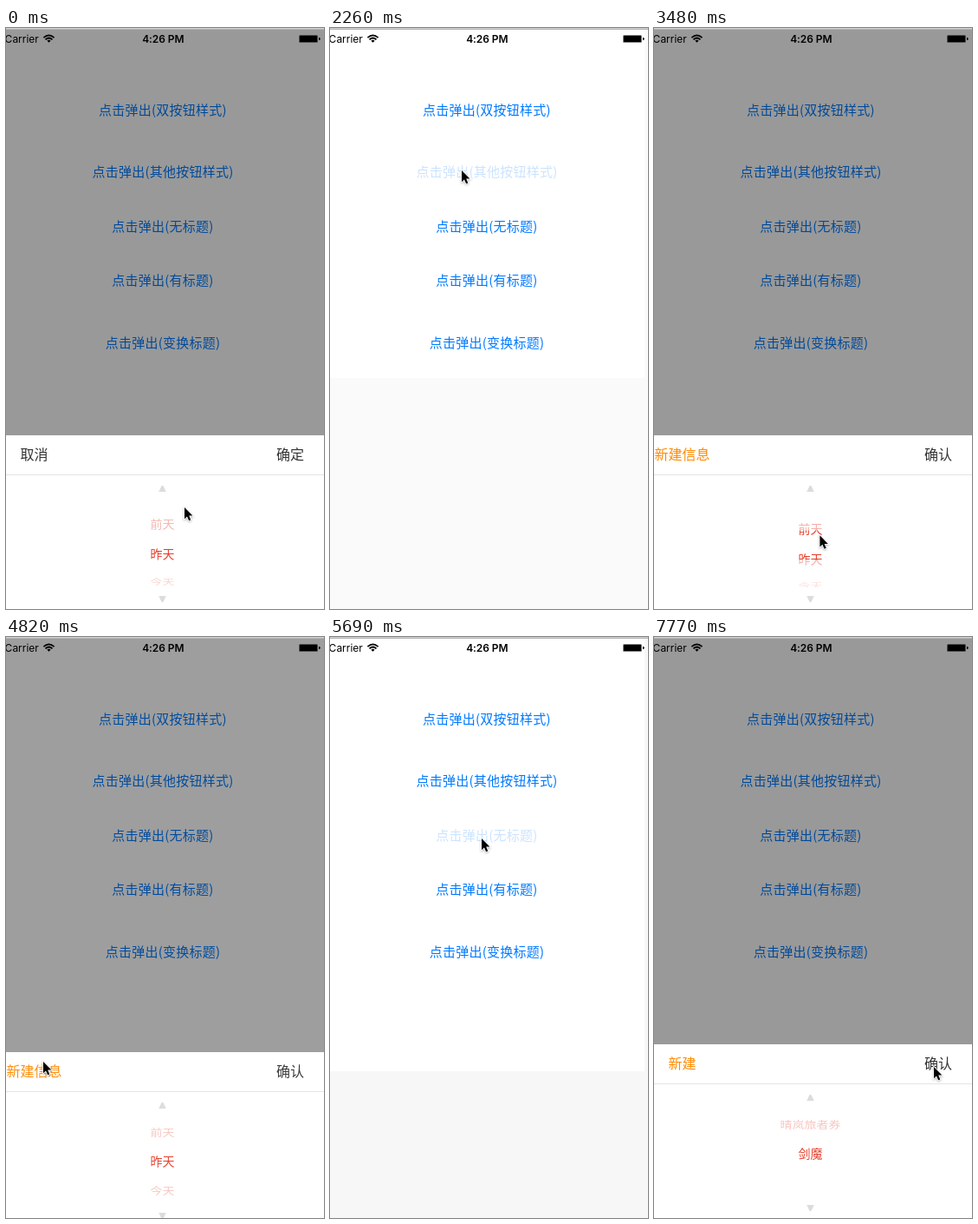
Write an HTML page that moves like this. It is 367 px wide and 669 px high and loops after 8000 ms.

```html
<!DOCTYPE html>
<html lang="zh-CN">
<head>
<meta charset="utf-8">
<style>
  html, body { margin: 0; width: 100%; height: 100%; overflow: hidden; background: #fff; }
  svg { display: block; width: 100%; height: 100%; }
  text { font-family: "Noto Sans CJK SC", "Noto Sans CJK", sans-serif; text-anchor: middle; }
  .status text { font: 400 12px Inter, sans-serif; text-anchor: start; }
  .status .clock { font-weight: 600; text-anchor: middle; letter-spacing: -.08px; }
  #links { font-size: 15px; letter-spacing: .25px; fill: #007aff; }
  .bar { font-size: 16px; fill: #333; }
  .wheel { font-size: 14px; fill: #e63c28; }
  #pointer { filter: drop-shadow(0 1px 1px rgba(0, 0, 0, .3)); }
</style>
</head>
<body>
<svg viewBox="0 0 367 669">
  <defs>
    <clipPath id="band"><rect y="109.5" width="367" height="34"/></clipPath>
    <clipPath id="beyond">
      <rect y="78" width="367" height="31.5"/>
      <rect y="143.5" width="367" height="31.5"/>
    </clipPath>
  </defs>

  <rect width="367" height="669" fill="#fff"/>
  <g id="residue">
    <rect id="haze" y="2" width="367" height="667"/>
    <rect id="cleared" y="2" width="363" fill="#fff"/>
  </g>

  <g class="status">
    <text x="-1.4" y="17">Carrier</text>
    <g fill="none" stroke="#000" stroke-width="1.7">
      <path d="M43.4 11.2Q49.5 5.6 55.6 11.2M45.5 13.3Q49.5 9.7 53.5 13.3"/>
      <path d="M49.5 16.8L47.4 14.7Q49.5 13 51.6 14.7Z" fill="#000" stroke="none"/>
    </g>
    <text class="clock" x="181.3" y="17">4:26 PM</text>
    <rect x="338" y="8" width="22" height="9" rx="1.5" fill-opacity=".5"/>
    <rect x="339" y="9" width="20" height="7" rx=".5"/>
    <path d="M361 10.8Q362.8 11.2 362.8 12.5T361 14.2Z"/>
  </g>

  <g id="links"></g>

  <g id="modal">
    <rect width="367" height="669" fill="#000" fill-opacity=".4"/>
    <g id="sheet">
      <rect width="367" height="201" fill="#fff"/>
      <rect y="45" width="367" height="1" fill="#e4e4e4"/>
      <g class="bar">
        <text id="left" x="32.5" y="28.3"></text>
        <text id="right" x="328" y="28.3"></text>
      </g>
      <path d="M176.3 65h8.4l-3-6.4q-1.2-1.6-2.4 0zM176.3 185h8.4l-3 6.4q-1.2 1.6-2.4 0z" fill="#dcdcdc"/>
      <g class="wheel" id="faint" clip-path="url(#beyond)"></g>
      <g class="wheel" id="solid" clip-path="url(#band)"></g>
    </g>
  </g>

  <rect width="367" height="1" fill="#d0d0d0"/>
  <rect y="1" width="367" height="1" fill="#b4b4b4"/>
  <path id="pointer" d="M0 0V13.2L3 10.4L5.1 15.3L7.3 14.4L5.2 9.6H9.4Z" stroke="#fff" stroke-width="1.6" paint-order="stroke"/>
</svg>

<script>
const LOOP = 8000, SLIDE = 300, PRESS = 120, SNAP = 250;
const RADIUS = 58, STEP = 35.5 * Math.PI / 180, ROW = 35;
const $ = id => document.getElementById(id);
const clamp = v => Math.min(1, Math.max(0, v));
const smooth = v => (v = clamp(v), v * v * (3 - 2 * v));
const mix = (a, b, k) => a + (b - a) * k;

const LINKS = { 双按钮样式: 95, 其他按钮样式: 166, 无标题: 229, 有标题: 291, 变换标题: 363 };
const DAYS = ['前天', '昨天', '今天'];

// grab: pointer height at which the first row is centred; the wheel follows from drag to release
const SHEETS = [
  { left: '取消', right: '确定', tint: '#333', rows: DAYS, open: -SLIDE, close: 1501,
    drag: 0, release: 450, grab: 576, haze: '#fafafa', cleared: 403 },
  { left: '新建信息', right: '确认', tint: '#ff8a00', rows: DAYS, open: 2380, close: 4782,
    drag: 3200, release: 4060, grab: 602, haze: '#f7f7f7', cleared: 500 },
  { left: '新建', right: '确认', tint: '#ff8a00', rows: ['晴岚旅者券', '剑魔'], open: 5810, close: Infinity,
    drag: 6550, release: 7300, grab: 545 }
];

const move = (start, end, x, y) => ({ start, end, x, y });
const MOVES = [
  move(0, 0, 206, 552),
  move(50, 230, 205, 540),
  move(450, 1090, 321, 426),
  move(1680, 2240, 152, 164),
  move(2440, 3140, 190, 635),
  move(3190, 3640, 192, 564),
  move(3640, 4000, 95, 529),
  move(4050, 4340, 43, 460),
  move(4340, 4520, 43, 489),
  move(4900, 5560, 175, 232),
  move(5860, 6490, 233, 545),
  move(6540, 7120, 232, 507),
  move(7290, 7770, 323, 495)
];

function pointerAt(t) {
  let { x, y } = MOVES[0];
  for (const m of MOVES.slice(1)) {
    const k = smooth((t - m.start) / (m.end - m.start));
    x = mix(x, m.x, k);
    y = mix(y, m.y, k);
  }
  return { x, y };
}

function selectedRow(sheet, t) {
  if (t < sheet.drag) return 0;
  const { y } = pointerAt(Math.min(t, sheet.release));
  const dragged = Math.max(0, (sheet.grab - y) / ROW);
  return mix(dragged, 1, smooth((t - sheet.release) / SNAP));
}

function visibility(sheet, t) {
  const closing = (t - sheet.close) / SLIDE;
  // the closing slide only becomes visible after a short jump
  return closing > .12 ? 1 - smooth(closing) : smooth((t - sheet.open + 40) / SLIDE);
}

function addText(parent, content, attrs) {
  const node = document.createElementNS('http://www.w3.org/2000/svg', 'text');
  node.textContent = content;
  for (const name in attrs) node.setAttribute(name, attrs[name]);
  return parent.appendChild(node);
}

const links = Object.entries(LINKS).map(([label, y]) =>
  addText($('links'), `点击弹出(${label})`, { x: 181, y: y + 5 }));
let current;

function fillSheet(sheet) {
  if (sheet === current) return;
  current = sheet;
  $('left').textContent = sheet.left;
  $('left').style.fill = sheet.tint;
  $('right').textContent = sheet.right;
  for (const id of ['faint', 'solid']) {
    $(id).replaceChildren();
    sheet.rows.forEach(row => addText($(id), row, { y: 4.6 }));
  }
}

function turnWheel(selected) {
  current.rows.forEach((_, i) => {
    const angle = (i - selected) * STEP, depth = Math.max(0, Math.cos(angle));
    for (const id of ['faint', 'solid']) {
      $(id).children[i].setAttribute('transform',
        `translate(180.5 ${126.5 + RADIUS * Math.sin(angle)}) scale(1 ${depth})`);
    }
    $('faint').children[i].setAttribute('opacity', .45 * depth * depth);
  });
}

function render(t) {
  const sheet = SHEETS.findLast(s => t >= s.open);
  const shown = visibility(sheet, t);
  const pointer = pointerAt(t);

  // each later sheet is opened by the link with the same index
  SHEETS.forEach(({ open }, i) => {
    links[i].style.opacity = t < open - PRESS ? 1 : mix(.2, 1, clamp((t - open) / SNAP));
  });

  $('residue').style.display = shown ? 'none' : '';
  if (!shown) {
    $('haze').setAttribute('fill', sheet.haze);
    $('cleared').setAttribute('height', sheet.cleared - 2);
  }

  fillSheet(sheet);
  turnWheel(selectedRow(sheet, t));
  $('modal').style.opacity = shown;
  $('sheet').setAttribute('transform', `translate(0 ${Math.round(669 - 200 * shown)})`);
  $('pointer').setAttribute('transform', `translate(${pointer.x} ${pointer.y})`);
}

const begin = performance.now();
function tick() {
  render((performance.now() - begin) % LOOP);
  requestAnimationFrame(tick);
}
tick();
</script>
</body>
</html>
```
